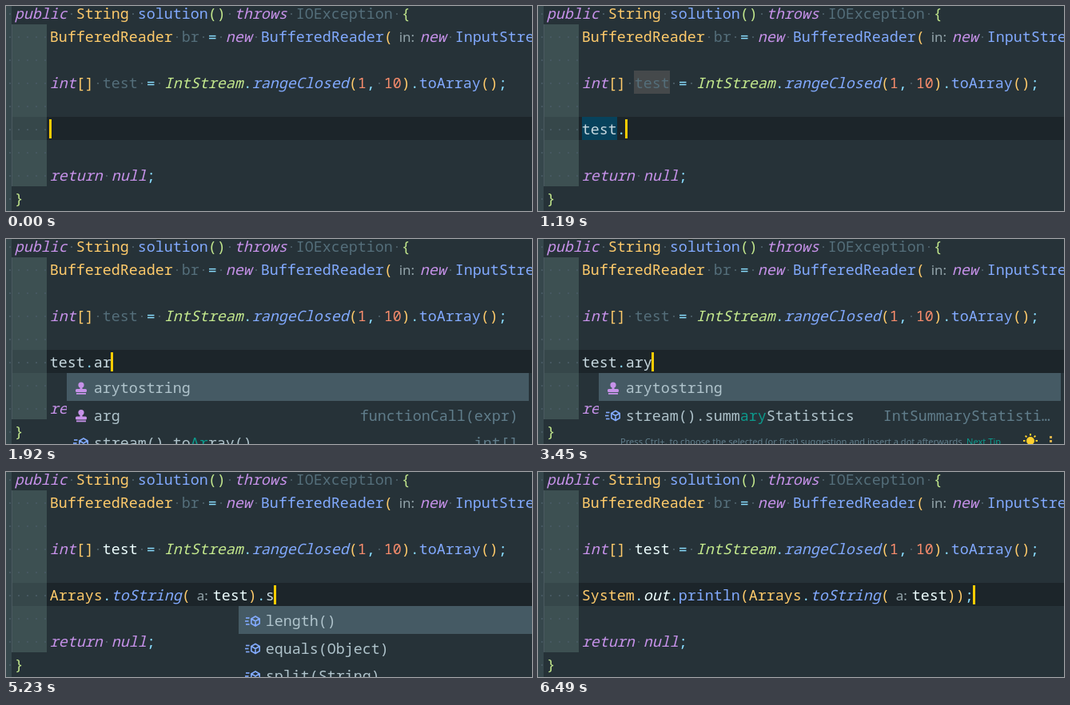
An HTML page with a canvas that plays this animation: 658 by 257 pixels, repeating every 7.03 s.

```html
<!DOCTYPE html>
<html lang="en">
<head>
<meta charset="utf-8">
<title>Postfix completion</title>
<style>
html, body { margin: 0; width: 100%; height: 100%; overflow: hidden; background: #263238; }
canvas { display: block; }
</style>
</head>
<body>
<canvas id="stage" width="658" height="257"></canvas>
<script>
const ctx = document.getElementById('stage').getContext('2d');
const LOOP = 7030, CH = 11, LINE = 29, LEFT = 54, BASE = 16, BEARING = 0.7;
const MONO = '500 18.333px "Noto Sans Mono", "DejaVu Sans Mono", monospace';
const HINT = '17px "Noto Sans", "Open Sans", sans-serif';
const TIP = '11.1px "Noto Sans", "Open Sans", sans-serif';

// Style keys: capital letters are italic.
const COLORS = {
  k: '#c792ea', y: '#ffcb6b', b: '#82aaff', g: '#546e7a', c: '#89ddff', n: '#f78c6c',
  e: '#c3e88d', w: '#eeffff', l: '#c8d9e0', p: '#b0c4cc', t: '#0c9a8c', r: '#607d8b'
};

function rect(x, y, w, h, color) {
  ctx.fillStyle = color;
  ctx.fillRect(x, y, w, h);
}

function hint(x, base, text) {
  ctx.font = HINT;
  ctx.fillStyle = '#93a4aa';
  ctx.fillText(text, x + 8 + BEARING, base);
  return x + Math.round(ctx.measureText(text).width + 14.3);
}

// Draws segments split by "|", each led by its style key; "h" is an inlay hint.
function write(x, base, markup) {
  if (!markup) return x;
  for (const seg of markup.split('|')) {
    const key = seg[0], text = seg.slice(1);
    if (key === 'h') { x = hint(x, base, text); continue; }
    const low = key.toLowerCase();
    ctx.font = (key !== low ? 'italic ' : '') + MONO;
    ctx.fillStyle = COLORS[low];
    ctx.fillText(text, x + BEARING, base);
    [...text].forEach((ch, i) => { if (ch === ' ') dot(x + i * CH, base); });
    x += text.length * CH;
  }
  return x;
}

function dot(x, base) {
  rect(x + 5, base - 7, 2, 2, '#465861');
}

function stamp(x, y) {
  ctx.fillStyle = COLORS.k;
  ctx.beginPath();
  ctx.arc(x, y - 4, 3.6, 0, 7);
  ctx.fill();
  ctx.fillRect(x - 1.5, y - 2, 3, 5);
  ctx.beginPath();
  ctx.roundRect(x - 7, y + 1, 14, 4, 1.5);
  ctx.fill();
  ctx.fillRect(x - 6, y + 6, 12, 1.8);
}

function cube(x, y) {
  ctx.strokeStyle = COLORS.b;
  ctx.lineWidth = 1.6;
  ctx.beginPath();
  for (let i = 0; i < 6; i++) {
    const a = Math.PI * (i / 3 + 1 / 6);
    ctx.lineTo(x + 3 + 6 * Math.cos(a), y + 6 * Math.sin(a));
  }
  ctx.closePath();
  ctx.moveTo(x - 2, y - 3);
  ctx.lineTo(x + 3, y);
  ctx.lineTo(x + 8, y - 3);
  ctx.moveTo(x + 3, y);
  ctx.lineTo(x + 3, y + 6);
  ctx.stroke();
  [-4, 0, 4].forEach((d, i) => rect(x - 9 - i % 2, y + d - 0.8, 4.5, 1.6, COLORS.b));
}

function bulb(x, y) {
  ctx.fillStyle = ctx.strokeStyle = '#ffd02e';
  ctx.beginPath();
  ctx.arc(x, y, 5, 0, 7);
  ctx.fill();
  ctx.lineWidth = 2;
  ctx.beginPath();
  for (let i = 0; i < 8; i++) {
    const a = i * Math.PI / 4, u = Math.cos(a), v = Math.sin(a);
    ctx.moveTo(x + 6.5 * u, y + 6.5 * v);
    ctx.lineTo(x + 9 * u, y + 9 * v);
  }
  ctx.stroke();
  for (const d of [-5, 0, 5]) rect(x + 24, y + d - 1, 3, 3, '#d9b04c');
}

function popup({ x, right, rows, tip, next }) {
  rect(x, 168, right - x, 89, '#263238');
  rect(x, 168, right - x, 35, '#455a64');
  rows.forEach(([icon, name, type], i) => {
    const base = 193 + i * 34.5;
    icon(x + 18, base - 6);
    write(x + 33, base, name);
    ctx.font = MONO;
    ctx.fillStyle = i ? COLORS.r : '#7891a0';
    ctx.fillText(type, right - 14 - type.length * CH + BEARING, base);
  });
  if (!tip) return;
  ctx.font = TIP;
  ctx.fillStyle = COLORS.r;
  ctx.fillText(tip, x + (next ? 27 : 25), 258);
  if (next) {
    ctx.fillStyle = COLORS.t;
    ctx.fillText(next, 536, 258);
    bulb(616, 253);
  }
}

function squiggle(x, color) {
  ctx.strokeStyle = color;
  ctx.lineWidth = 1.1;
  ctx.beginPath();
  for (let i = 0; i < 5; i++) ctx.lineTo(x + i * 2, i % 2 ? 164 : 166);
  ctx.stroke();
}

const nameList = { x: 20, right: 654, rows: [[cube, 'ttest', 'int[]']] };
const memberList = { x: 76, right: 654, rows: [
  [cube, 'plength', 'int'], [cube, 'pclone()', 'int[]'], [cube, 'pstream()', 'IntStream']] };
const arList = { x: 76, right: 654, rows: [
  [stamp, 'parytostring', ''], [stamp, 'parg', 'functionCall(expr)'],
  [cube, 'pstream().to|tAr|pray()', 'int[]']] };
const aryList = { x: 76, right: 654, rows: [
  [stamp, 'parytostring', ''], [cube, 'pstream().summ|tary|pStatistics', 'IntSummaryStatisti…']],
  tip: 'Press Ctrl+. to choose the selected (or first) suggestion and insert a dot afterwards',
  next: 'Next Tip' };
const stringList = { x: 291, right: 869, rows: [
  [cube, 'plength()', 'int'], [cube, 'pequals(Object)', 'boolean'], [cube, 'psplit(String)', 'String[]']] };
const soutList = { x: 291, right: 869, rows: [
  [stamp, 'psout', 'System.out.println(expr)'], [stamp, 'psoutv', 'System.out.println(expr)']],
  tip: 'Ctrl+Down and Ctrl+Up will move caret down and up in the editor' };

const call = 'yArrays|c.|BtoString|y(';
const joined = call + '|ha:|wtest|y)';
const print = 'ySystem|c.|Wout|c.|bprintln|y(|' + call;
const used = true;

// [start in ms, text of the edited line, extras]
const steps = [
  [0, ''],
  [600, 'lt'],
  [660, 'lte'],
  [800, 'ltes'],
  [860, 'ltes', { list: nameList }],
  [1060, 'ltest', { list: nameList }],
  [1190, 'ltest|c.', { mark: true }],
  [1260, 'ltest|c.'],
  [1330, 'ltest|c.', { list: memberList }],
  [1720, 'ltest|c.|la', { list: memberList }],
  [1790, 'ltest|c.|la', { list: arList }],
  [1920, 'ltest|c.|lar', { list: arList }],
  [2250, 'ltest|c.|lary', { list: arList }],
  [2380, 'ltest|c.|lary', { list: aryList }],
  [2920, 'ltest|c.|lary', { list: aryList, blink: true }],
  [3450, 'ltest|c.|lary', { list: aryList }],
  [3710, call + '|wtest|y)', { used }],
  [3780, joined, { used, braces: true }],
  [4440, joined + '|c.', { used, error: '#ff5370' }],
  [4570, joined + '|c.', { used, error: '#ff5370', list: stringList }],
  [5230, joined + '|c.|ls', { used, list: stringList }],
  [5300, joined + '|c.|ls', { used, list: soutList }],
  [5430, joined + '|c.|lso', { used, list: soutList }],
  [5500, joined + '|c.|lsou', { used, list: soutList }],
  [5630, joined + '|c.|lsout', { used, list: soutList, error: '#c0c8cc' }],
  [6430, print + '|wtest|y))|c;', { used }],
  [6490, print + '|ha:|wtest|y))|c;', { used }]
];

function draw(t) {
  const [, text, o = {}] = steps.findLast(s => s[0] <= t);
  const at = n => BASE + n * LINE;

  rect(0, 0, 658, 257, '#263238');
  rect(0, 0, 7, 257, '#36474c');
  rect(7, 23, 44, 203, '#3d5052');
  rect(7, 139, 44, LINE, '#36474a');
  rect(7, 23, 1, 203, '#4a5960');
  rect(51, 139, 607, LINE, '#1c252a');
  for (let n = 1; n < 8; n++) for (let i = 0; i < 4; i++) dot(10 + i * CH, at(n));
  for (let n = 0; n < 9; n++) dot(10 - CH, at(n));

  if (o.mark) {
    rect(120, 81, 45, LINE, '#45494b');
    rect(55, 139, 44, LINE, '#07425c');
  }
  if (o.braces) {
    rect(220, 139, 10, LINE, '#3b514d');
    rect(302, 139, 10, LINE, '#3b514d');
  }

  write(10, at(0), 'Kpublic |yString |bsolution|e() |Kthrows |gIOException |e{');
  write(LEFT, at(1), 'yBufferedReader |gbr |c= |Knew |bBufferedReader|y(|hin:|Knew |bInputStreamReader');
  write(LEFT, at(3), `Kint|y[] |${o.used ? 'w' : 'g'}test |c= |EIntStream|c.|BrangeClosed|y(|n1|c, |n10|y)|c.|btoArray|y()|c;`);
  write(LEFT, at(7), 'Kreturn null|c;');
  write(10, at(8), 'e}');

  const end = write(LEFT, at(5), text);
  if (o.error) squiggle(end + 3, o.error);
  if (!o.blink) rect(end, 142, 3, 24, '#ffcc00');
  if (o.list) popup(o.list);
}

function tick() {
  draw(performance.now() % LOOP);
  requestAnimationFrame(tick);
}
tick();
</script>
</body>
</html>
```
